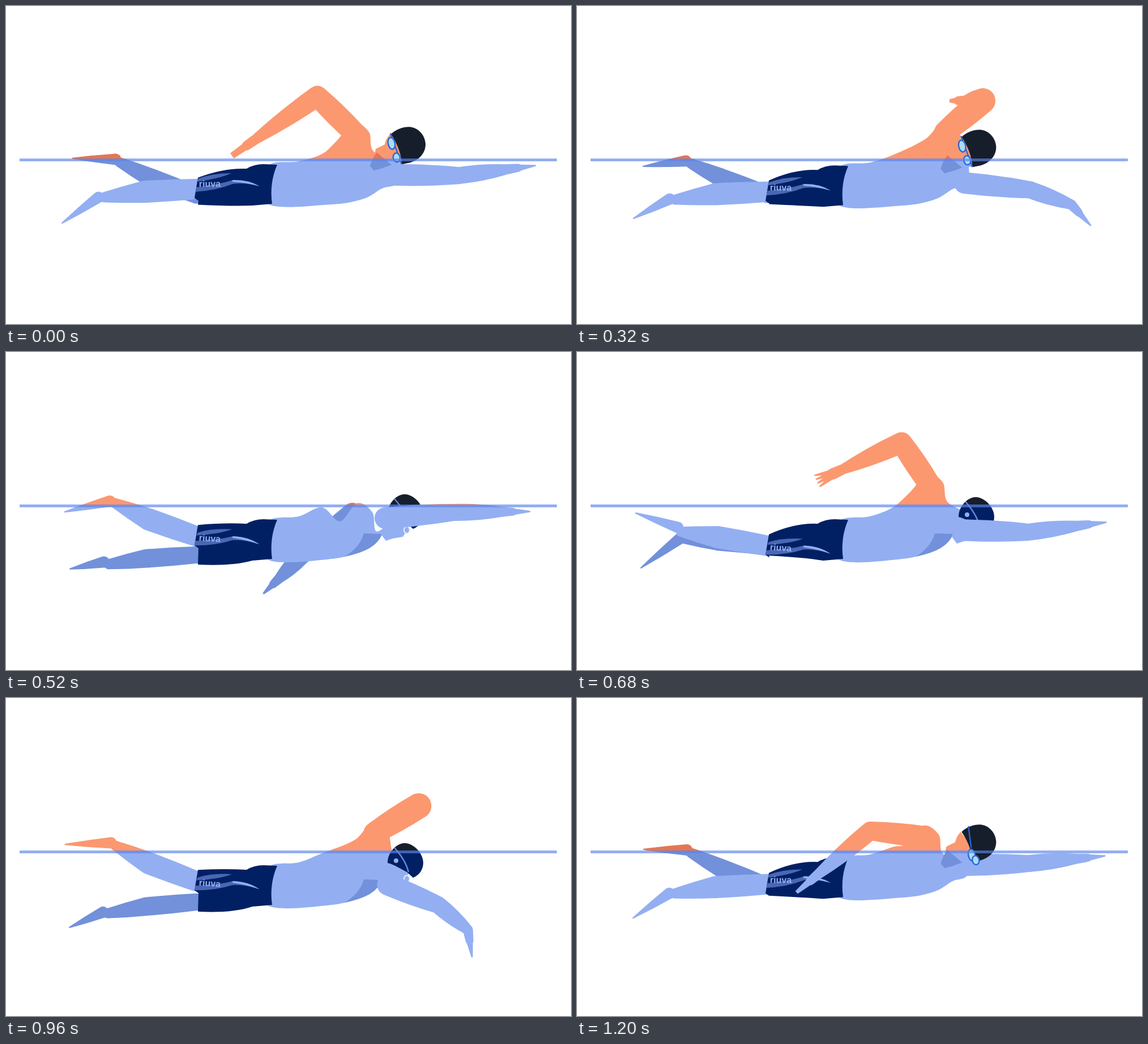
Recreate the animation shown at these times as an HTML page. Size 998 px wide and 561 px high, loop 1240 ms.

```html
<!DOCTYPE html>
<html lang="en">
<head>
<meta charset="utf-8">
<title>Front crawl</title>
<style>
html, body { margin: 0; width: 100%; height: 100%; overflow: hidden; background: #fff; }
svg { display: block; width: 100vw; height: 100vh; }
.air { --skin: #fb9870; --shade: #e37752; --cap: #171e2b; }
.water { --skin: #93aff2; --shade: #7291da; --cap: #002063; }
.skin { fill: var(--skin); }
.shade { fill: var(--shade); }
.mark { font: bold 16px "Liberation Sans", sans-serif; text-anchor: middle; fill: #93aff2; }
</style>
</head>
<body>
<svg viewBox="0 0 998 561">
  <defs>
    <clipPath id="above"><rect width="998" height="270"/></clipPath>
    <clipPath id="below"><rect y="270" width="998" height="291"/></clipPath>
    <clipPath id="cloth"><path id="clothEdge"/></clipPath>
    <g id="swimmer">
      <path id="farArm"/>
      <path id="farLeg" class="shade"/>
      <path id="torso" class="skin"/>
      <path id="chest" class="shade" d="M632 320L664 321Q655 350 598 361Q625 345 632 320Z"/>
      <g class="head">
        <path id="face" class="skin"/>
        <path id="neck" class="shade" d="M-56 14Q-64 24-68 38L-61 46Q-45 42-30 36Z"/>
        <path id="cap"/>
        <g id="goggles" stroke="#2a66d4" stroke-width="2.4" fill="#a9dcf5">
          <path id="strap"/>
          <ellipse id="lensA" rx="6" ry="10.5"/>
          <ellipse id="lensB" rx="6" ry="8"/>
        </g>
        <g id="side">
          <path d="M-20-22Q0 0 5 21" fill="none" stroke="#5f88e4" stroke-width="2.5"/>
          <circle cx="-17" cy="1" r="4" fill="#93aff2"/>
          <ellipse cx="2" cy="33" rx="5" ry="6" fill="#93aff2" stroke="#e6effd" stroke-width="2"/>
        </g>
      </g>
      <path id="nearLeg" class="skin"/>
      <path id="shorts" fill="#002063"/>
      <g clip-path="url(#cloth)">
        <g id="print">
          <path d="M-22-9Q4-19 38-19Q16-9-24-4Z" fill="#4a67b4"/>
          <path d="M-26 6Q18 1 40-7Q68-8 88 4Q62-3 40 0Q10 12-28 14Z" fill="#4a67b4"/>
          <path d="M40-7Q68-8 88 4Q62-3 40-4Z" fill="#93aff2"/>
          <text class="mark" y="5">riuva</text>
        </g>
      </g>
      <path id="nearArm" class="skin"/>
    </g>
  </defs>
  <use href="#swimmer" class="air" clip-path="url(#above)"/>
  <use href="#swimmer" class="water" clip-path="url(#below)"/>
  <rect x="24" y="269" width="949" height="5" fill="#5b85ec" opacity=".66"/>
</svg>
<script>
const LOOP = 1240, STEP = 40, TURN = 2 * Math.PI / LOOP;
const $ = id => document.getElementById(id);
const set = (id, d) => $(id).setAttribute('d', d);
const show = (id, on) => { $(id).style.display = on ? '' : 'none'; };
const clamp = v => Math.min(1, Math.max(0, v));
const mix = (a, b, u) => [a[0] + (b[0] - a[0]) * u, a[1] + (b[1] - a[1]) * u];
const txt = p => p[0].toFixed(1) + ' ' + p[1].toFixed(1);

// One arm stroke: time, shoulder, elbow, wrist. The other arm is half a loop away.
const STROKE = [
  [0, 618,226, 550,159, 441,235],
  [160, 632,212, 604,133, 535,154],
  [220, 634,219, 625,150, 608,156],
  [320, 650,220, 717,165, 683,165],
  [420, 652,246, 765,237, 865,245],
  [520, 670,277, 790,267, 875,266],
  [620, 690,298, 800,299, 885,288],
  [840, 680,299, 785,307, 882,296],
  [940, 685,310, 800,322, 873,348],
  [985, 650,318, 690,385, 715,445],
  [1040, 600,326, 613,392, 639,449],
  [1140, 612,269, 522,344, 483,383],
  [1200, 616,243, 518,232, 427,308]
];

// How far the body has rolled face down: 0 when breathing, 1 when looking down
function bodyRoll(t) {
  const u = clamp((.4 - .5 * Math.cos(TURN * (t - 140))) / .4);
  return u * u * (3 - 2 * u);
}

// Soft pulse on the loop
function bump(t, at, width) {
  const d = (t - at + 1.5 * LOOP) % LOOP - LOOP / 2;
  return Math.exp(-d * d / (width * width));
}

// Periodic monotone cubic through the keys
function sample(keys, t) {
  const n = keys.length;
  const at = i => ({ k: keys[(i + n) % n], time: keys[(i + n) % n][0] + Math.floor(i / n) * LOOP });
  let i = n - 1;
  while (keys[i][0] > t) i--;
  const [p, a, b, q] = [-1, 0, 1, 2].map(o => at(i + o));
  const h = b.time - a.time, u = (t - a.time) / h;
  const mean = (x, y) => x * y <= 0 ? 0 : 2 * x * y / (x + y);
  return a.k.slice(1).map((v, j) => {
    const rate = (m, o) => (o.k[j + 1] - m.k[j + 1]) / (o.time - m.time);
    const mid = rate(a, b), m0 = mean(rate(p, a), mid) * h, m1 = mean(mid, rate(b, q)) * h;
    const d = b.k[j + 1] - v;
    return v + u * (m0 + u * (3 * d - 2 * m0 - m1 + u * (m0 + m1 - 2 * d)));
  });
}

// Closed smooth curve through points
function smooth(pts) {
  const n = pts.length, at = i => pts[(i + n) % n];
  const lean = (p, a, b, s) => [p[0] + (b[0] - a[0]) * s, p[1] + (b[1] - a[1]) * s];
  return 'M' + txt(pts[0]) + pts.map((p, i) => {
    const q = at(i + 1);
    return 'C' + [lean(p, at(i - 1), q, 1 / 6), lean(q, p, at(i + 2), -1 / 6), q].map(txt).join(' ');
  }).join('') + 'Z';
}

const disc = ([x, y], r) => `M${txt([x - r, y])}a${r} ${r} 0 1 0 ${2 * r} 0a${r} ${r} 0 1 0 ${-2 * r} 0Z`;

// Tapered bone with round ends and a little muscle in the middle
function bone(a, b, ra, rb, bulge = 0) {
  const dx = b[0] - a[0], dy = b[1] - a[1], len = Math.hypot(dx, dy) || 1;
  const side = (p, r) => txt([p[0] - dy / len * r, p[1] + dx / len * r]);
  const m = mix(a, b, .5), rm = (ra + rb) / 2 + bulge;
  return `M${side(a, ra)}Q${side(m, rm)} ${side(b, rb)}L${side(b, -rb)}Q${side(m, -rm)} ${side(a, -ra)}Z`
    + disc(a, ra) + disc(b, rb);
}

function armPose(phase, roll) {
  const v = sample(STROKE, phase), drop = 16 * roll;
  return [0, 2, 4].map(i => [v[i], v[i + 1] + drop]);
}

function arm([s, e, w], phase) {
  const upper = Math.atan2(e[1] - s[1], e[0] - s[0]), fore = Math.atan2(w[1] - e[1], w[0] - e[0]);
  const elbow = 15 + 4 * (1 - Math.cos(fore - upper));
  const spread = bump(phase, 150, 130), palm = 7 + 5 * spread;
  const hand = Math.min(50, .7 * Math.hypot(w[0] - e[0], w[1] - e[1]));
  const aim = fore + bump(phase, 1000, 70);
  const reach = (p, len, angle) => [p[0] + len * Math.cos(angle), p[1] + len * Math.sin(angle)];
  const knuckles = reach(w, hand * .4, aim);
  let d = bone(s, e, 19, elbow, 3) + bone(e, w, elbow, 9, 4) + bone(w, knuckles, 9, palm);
  for (let i = -1.5; i <= 1.5; i++) {
    const root = reach(knuckles, palm * .4 * i * spread, aim + Math.PI / 2);
    d += bone(root, reach(root, hand * .6, aim + i * spread * .25), 6 - 2 * spread, 1.4);
  }
  return d;
}

// Flutter kick, three beats a loop: joints swing around a rest line, the toe last
const NEAR = { x: [336, 248, 183, 102], y: [317, 309, 303, 335], swing: [6, 20, 37, 50], sink: [26, 20, 18, 1], more: [15, 20, 27, 38], beat: 0 };
const FAR = { x: [336, 251, 191, 115], y: [341, 332, 326, 330], swing: [8, 32, 54, 64], sink: [0, 0, 0, 3], more: [12, 6, 3, 17], beat: .5 };
const SWAY = [0, -4, -11, -3];

function legPose(t, leg, roll) {
  return leg.x.map((x, i) => {
    const lag = i > 2 ? .95 : .9;
    const s = Math.tanh(2 * Math.cos(2 * Math.PI * (3 * t / LOOP + leg.beat - lag)));
    return [x + SWAY[i] * s, leg.y[i] + roll * leg.sink[i] + s * (leg.swing[i] + roll * leg.more[i])];
  });
}

function leg([hip, knee, ankle, toe], girth) {
  const dx = toe[0] - ankle[0], dy = toe[1] - ankle[1], len = Math.hypot(dx, dy);
  const heel = [ankle[0] + (dx * 8 - dy * 5) / len, ankle[1] + (dy * 8 + dx * 5) / len];
  return bone(hip, knee, 18 * girth, 19.5 * girth, 1) + bone(knee, ankle, 19.5 * girth, 9, 1)
    + bone(heel, toe, 10, 1.2, 1);
}

function torso(near, far, roll) {
  // The back humps under whichever shoulder is higher
  const [x, y] = mix(far, near, 1 / (1 + Math.exp((near[1] - far[1]) / 6)));
  return smooth([
    [462, 283 + 17 * roll], [517, 274 + 16 * roll], [558, 261 + 13 * roll],
    [x - 34, y + 12], [x - 4, y - 20], [x + 23, y - 4], [x + 31, y + 30],
    [692, 282 + 8 * roll], [692 - 27 * roll, 313 + 9 * roll], [664 - 6 * roll, 322 + 9 * roll],
    [632, 340 + 9 * roll], [575, 350 + 15 * roll], [462, 349 + 17 * roll]
  ]);
}

function shorts(hipA, hipB, roll) {
  const top = Math.min(hipA, hipB), hem = Math.max(hipA, hipB) + 17, d = 16 * roll;
  return `M339 ${top - 20}Q385 ${285 + d} 425 ${287 + d}Q438 ${279 + d} 455 ${279 + d}L479 ${280 + d}`
    + `Q465 ${312 + d} 470 ${349 + d}L435 ${352 + d}Q400 ${hem + 3} 339 ${hem}L340 ${top + 21}L333 ${top + 16}Z`;
}

const OUTWARD = {
  cap: 'M-31-18C-22-27-10-31 1-31C18-30 29-16 30-2C31 14 20 27 3 32L-12 35C-12 22-18 0-31-18Z',
  face: 'M-33-18Q-41-8-42 0L-58 8L-62 30L-30 36L-11 34L-18 0Z'
};
const DOWNWARD = {
  cap: 'M-32 5C-32-15-15-30-2-30C14-30 31-12 31 5C31 16 24 27 13 31L2 21C-8 16-20 8-32 5Z',
  face: 'M-34 8L-44 40L-35 52L-23 48L-5 45L3 33L5 22L-20 2Z'
};

function drawHead(t, roll) {
  const out = roll < .5, look = out ? OUTWARD : DOWNWARD;
  const turn = clamp(-5 * Math.sin(TURN * t));
  document.querySelector('.head').setAttribute('transform',
    `translate(${711 - 5 * roll} ${244 + 37 * roll + 5 * turn})`);
  set('cap', look.cap);
  set('face', look.face);
  $('cap').style.fill = out ? '#171e2b' : 'var(--cap)';
  for (const id of ['goggles', 'neck']) show(id, out);
  for (const id of ['side', 'chest']) show(id, !out);
  const place = (id, p, q) =>
    $(id).setAttribute('transform', `translate(${txt(mix(p, q, turn))}) rotate(-12)`);
  place('lensA', [-30, -2], [-13, 23]);
  place('lensB', [-21, 23], [-6, 32]);
  set('strap', `M${txt(mix([-32, -20], [-19, -28], turn))}L${txt(mix([-12, 35], [-14, 10], turn))}`);
}

function draw(t) {
  const roll = bodyRoll(t), farPhase = (t + LOOP / 2) % LOOP;
  const near = armPose(t, roll), far = armPose(farPhase, roll);
  const nearLeg = legPose(t, NEAR, roll), farLeg = legPose(t, FAR, roll);
  set('nearArm', arm(near, t));
  set('farArm', arm(far, farPhase));
  $('farArm').setAttribute('class', farPhase > 1000 && farPhase < 1220 ? 'shade' : 'skin');
  set('nearLeg', leg(nearLeg, 1));
  set('farLeg', leg(farLeg, .84));
  set('torso', torso(near[0], far[0], roll));
  const hip = nearLeg[0][1], cloth = shorts(hip, farLeg[0][1], roll);
  set('shorts', cloth);
  set('clothEdge', cloth);
  $('print').setAttribute('transform', `translate(360 ${hip - 9 + 13 * roll}) rotate(${4 * roll})`);
  drawHead(t, roll);
}

let start;
function tick(now) {
  start ??= now;
  draw(Math.floor((now - start) % LOOP / STEP) * STEP);
  requestAnimationFrame(tick);
}
draw(0);
requestAnimationFrame(tick);
</script>
</body>
</html>
```
